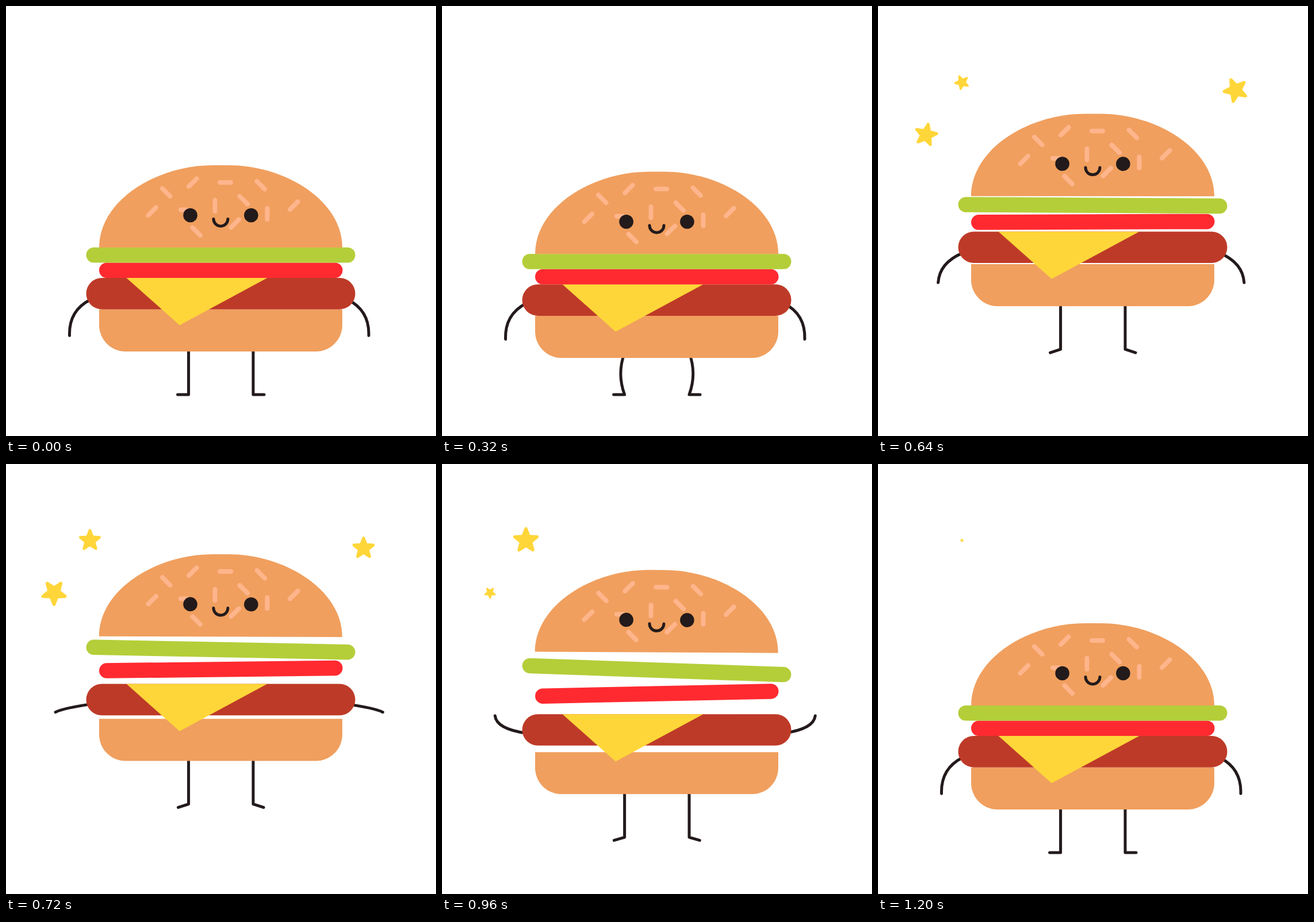
Write an HTML page that moves like this. It is 748x748 px and loops after 1240 ms.

```html
<!DOCTYPE html>
<html lang="en">
<head>
<meta charset="utf-8">
<title>Jumping burger</title>
<style>
  html, body { margin: 0; width: 100%; height: 100%; overflow: hidden; background: #fff; }
  svg { display: block; width: 100%; height: 100%; }
  .line { fill: none; stroke: #231a1b; stroke-width: 5; stroke-linecap: round; stroke-linejoin: round; }
  .bun { fill: #f09f5e; }
  .star { fill: #ffd639; stroke: #ffd639; stroke-width: 6; stroke-linejoin: round; }
</style>
</head>
<body>
<svg viewBox="0 0 748 748">
  <g id="stars"></g>
  <path id="legL" class="line"/>
  <path id="legR" class="line"/>
  <path id="bottom" class="bun" d="M162 527.8H585V555A46 46 0 0 1 539 601H208A46 46 0 0 1 162 555Z"/>
  <g id="patty">
    <path id="armR" class="line"/>
    <path id="armL" class="line" transform="translate(741.5 0) scale(-1 1)"/>
    <rect x="139.5" y="473" width="468" height="54.7" rx="27.3" fill="#be3a28"/>
    <path d="M209.500 473H454.500L302 555.300Z" fill="#ffd639"/>
  </g>
  <rect id="tomato" x="162" y="446.5" width="423.5" height="26.5" rx="13.2" fill="#ff2a30"/>
  <rect id="lettuce" x="139.5" y="420" width="468" height="26.5" rx="13.2" fill="#b4ce39"/>
  <g id="top">
    <path class="bun" d="M162 420.300C162 338 262 277 360 277H387C485 277 585 338 585 420.300Z"/>
    <path fill="none" stroke="#ffb58c" stroke-width="8" stroke-linecap="round"
      d="M247.500 364l13.500-13.500M272 317.500l13.500 13.500M318 314l13.500-13.500M372 307h19
         M436.500 305l13.500 13.500M494 354l13.500-13.500M363.500 338v19M454.500 352v19
         M406.500 331l13.500 13.500M391.500 385l13.500-13.500M324.500 385.500l13.500 13.500M304 354.500h11"/>
    <g fill="#231a1b"><circle cx="320.6" cy="364" r="12.3"/><circle cx="426.4" cy="364" r="12.3"/></g>
    <path class="line" d="M361 370.500a12.500 12.500 0 0 0 25 0"/>
  </g>
</svg>
<script>
const LOOP = 1240, STEP = 40, GROUND = 676, RAD = Math.PI / 180;
const TAKEOFF = 400, PEAK = 770, HEIGHT = 85;
const $ = id => document.getElementById(id);
const set = (el, name, value) => el.setAttribute(name, value);
const mix = (a, b, u) => a + (b - a) * u;
const part = (t, a, b) => Math.min(1, Math.max(0, (t - a) / (b - a)));
const smooth = (t, a, b) => {
  const u = part(t, a, b);
  return u * u * (3 - 2 * u);
};

// Crouch, spring up, fall back to the ground.
function jump(t) {
  if (t < TAKEOFF) return 15 * (smooth(t, 0, 200) - part(t, 240, TAKEOFF) ** 2);
  if (t < PEAK) return -HEIGHT * (1 - (1 - part(t, TAKEOFF, PEAK)) ** 2.5);
  return -HEIGHT * (1 - smooth(t, PEAK, 1073));
}
const spread = t => smooth(t, 565, 860) - smooth(t, 1010, 1160);
const swing = t => smooth(t, 590, 840) - smooth(t, 1030, 1160);
const tilt = t => 18 * (Math.sin(part(t, TAKEOFF, 640) * Math.PI / 2) - part(t, 800, 1160) ** 3);

function layer(id, y, angle = 0, pivot = 0) {
  set($(id), "transform", `translate(0 ${y}) rotate(${angle} 373.5 ${pivot})`);
}

function leg(id, x, side, y, angle) {
  const ankle = Math.min(GROUND, GROUND + y), hip = Math.min(592 + y, 604);
  const bow = Math.max(0, y) * 1.2, a = angle * RAD;
  set($(id), "d", `M${x} ${hip}Q${x + side * bow} ${(hip + ankle) / 2} ${x} ${ankle}`
    + `l${side * 19 * Math.cos(a)} ${19 * Math.sin(a)}`);
}

// The hand swings round the shoulder; the arms lag behind a crouch.
function arms(raise, y) {
  const sx = 595, sy = mix(511, 506, raise) - .45 * Math.max(0, y);
  const reach = (r, deg) => `${sx + r * Math.cos(deg * RAD)} ${sy + r * Math.sin(deg * RAD)}`;
  const elbow = reach(mix(42, 52, raise), mix(27, -8, raise));
  const hand = reach(62 + 10 * (1 - raise) ** 8, mix(60, -29, raise));
  for (const id of ["armL", "armR"]) set($(id), "d", `M${sx} ${sy}Q${elbow} ${hand}`);
}

const starShape = "M" + Array.from({ length: 10 }, (_, i) => {
  const a = (i * 36 - 90) * RAD, r = i % 2 ? 9.5 : 22;
  return `${r * Math.cos(a)} ${r * Math.sin(a)}`;
}).join("L") + "Z";

// Each star swells and shrinks from "from" to "to" and stands straight at "upright".
const stars = [
  { x: 622, y: 146.5, size: .9, from: 320, to: 940, upright: 480 },
  { x: 83.5, y: 224, size: .92, from: 390, to: 1062, upright: 840 },
  { x: 146, y: 133, size: 1, from: 510, to: 1230, upright: 720 }
];
for (const s of stars) {
  s.el = document.createElementNS("http://www.w3.org/2000/svg", "path");
  set(s.el, "class", "star");
  set(s.el, "d", starShape);
  $("stars").append(s.el);
}

function draw(t) {
  const y = jump(t), s = spread(t), foot = tilt(t);
  layer("bottom", y);
  layer("patty", y - 11.2 * s);
  layer("tomato", y - 33.5 * s, -1.2 * s, 459.75);
  layer("lettuce", y - 48 * s, 2 * s, 433.25);
  layer("top", y - 66 * s, .3 * s, 360);
  leg("legL", 317.6, -1, y, foot);
  leg("legR", 430, 1, y, foot);
  arms(swing(t), y);
  for (const star of stars) {
    const k = star.size * Math.sin(Math.PI * part(t, star.from, star.to));
    set(star.el, "visibility", k > .01 ? "visible" : "hidden");
    set(star.el, "transform",
      `translate(${star.x} ${star.y}) rotate(${(t - star.upright) * .3}) scale(${k})`);
  }
}

const start = performance.now();
function tick() {
  const t = (performance.now() - start) % LOOP;
  draw(Math.floor(t / STEP) * STEP);
  requestAnimationFrame(tick);
}
tick();
</script>
</body>
</html>
```
